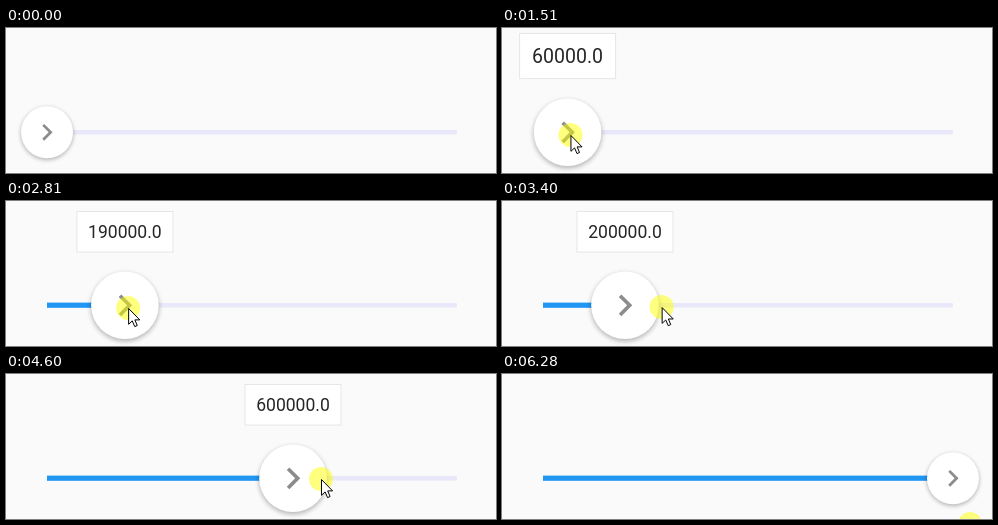
An HTML page that plays this animation: 490 by 145 pixels, repeating every 6410 ms.

```html
<!DOCTYPE html>
<html lang="en">
<head>
<meta charset="utf-8">
<title>Range step slider</title>
<style>
  html, body { margin: 0; width: 100%; height: 100%; overflow: hidden; background: #fafafa; }
  svg { display: block; width: 100vw; height: 100vh; }
  text { font-family: Roboto, sans-serif; fill: #262626; text-anchor: middle; }
</style>
</head>
<body>
<svg viewBox="0 0 490 145">
  <defs>
    <filter id="soft" x="-30%" y="-30%" width="160%" height="160%">
      <feGaussianBlur stdDeviation="2"/>
    </filter>
  </defs>
  <rect width="490" height="145" fill="#fafafa"/>
  <rect x="41" y="102" width="410" height="4.6" rx="1" fill="#e8e8fa"/>
  <rect id="bar" x="41" y="101.6" height="5.2" fill="#2196f3"/>
  <g id="tip">
    <rect id="box" fill="#fff" stroke="#e6e6e6"/>
    <text id="label"></text>
  </g>
  <g id="thumb">
    <circle cy="1.5" r="26.2" fill="#000" opacity=".28" filter="url(#soft)"/>
    <circle r="26" fill="#fff"/>
    <path d="M10 6L8.59 7.41 13.17 12l-4.58 4.59L10 18l6-6z" fill="#8c8c8c"
          transform="scale(1.4) translate(-12 -12)"/>
  </g>
  <g id="pointer">
    <circle r="12" fill="#ff0" opacity=".5"/>
    <path d="M.5 .5V16.3L4.1 12.9 6.6 18.6 9.1 17.5 6.7 11.9H11.6Z" fill="#fff" stroke="#000"/>
  </g>
</svg>
<script>
const LOOP = 6410, PRESS = 792, RELEASE = 5800;
const LEFT = 41, SPAN = 410, MID = 104.3, MAX = 1e6;
const GRAB = 4;            // pointer offset from the thumb centre
const FONT = 20.3, PAD = 13.5, MAX_BOX = 97;

// pointer path: time, x, y
const path = [
  [540, 54, 158], [780, 45, 107], [1200, 45, 107], [1850, 94, 107], [2120, 94, 107],
  [2790, 122, 107], [2860, 122.5, 107], [3450, 163, 106], [3910, 233, 105.5], [4140, 259, 105],
  [5260, 395, 105], [5390, 418, 105], [5700, 452, 107], [5810, 458, 107],
  [6110, 468, 151], [6279, 468, 151], [6280, 468, 150]
];

const el = id => document.getElementById(id);
const [bar, tip, box, label, thumb, pointer] =
  ['bar', 'tip', 'box', 'label', 'thumb', 'pointer'].map(el);
const clamp = (v, lo, hi) => Math.min(hi, Math.max(lo, v));
const set = (node, attrs) => {
  for (const name in attrs) node.setAttribute(name, attrs[name]);
};

function pointerAt(t) {
  if (t <= path[0][0]) return path[0].slice(1);
  const i = path.findIndex(p => p[0] > t);
  if (i < 0) return path[path.length - 1].slice(1);
  const [t0, x0, y0] = path[i - 1], [t1, x1, y1] = path[i];
  const k = (t - t0) / (t1 - t0);
  return [x0 + (x1 - x0) * k, y0 + (y1 - y0) * k];
}

// fine steps up to 200000, coarse ones above
function snap(raw) {
  const fine = Math.round(raw / 1e4) * 1e4;
  if (fine <= 2e5) return Math.max(0, fine);
  return clamp(Math.round(raw / 2e5) * 2e5, 2e5, MAX);
}

function valueAt(t) {
  if (t < PRESS) return 0;
  if (t >= RELEASE) return MAX;
  return snap((pointerAt(t)[0] - GRAB - LEFT) / SPAN * MAX);
}

function elasticOut(t) {
  if (t >= 1) return 1;
  return 2 ** (-10 * t) * Math.sin((t - 0.1) * 5 * Math.PI) + 1;
}

// cubic-bezier(.4, 0, .2, 1)
function fastOutSlowIn(x) {
  let lo = 0, hi = 1;
  for (let i = 0; i < 20; i++) {
    const s = (lo + hi) / 2, r = 1 - s;
    if (1.2 * r * r * s + 0.6 * r * s * s + s ** 3 < x) lo = s; else hi = s;
  }
  return 3 * lo * lo - 2 * lo ** 3;
}

function drawTip(x, value, slide) {
  const text = value.toFixed(1);
  const natural = ((text.length - 1) * 0.5615 + 0.263) * FONT + 2 * PAD;
  const k = Math.min(1, MAX_BOX / natural);
  const w = natural * k, h = 48 * k, top = 55 - 52 * k + slide;
  set(box, { x: x - w / 2 + 0.5, y: top + 0.5, width: w - 1, height: h - 1 });
  set(label, { x, y: top + h / 2 + 7.2 * k, 'font-size': FONT * k });
  label.textContent = text;
}

function draw(t) {
  const held = t >= PRESS && t < RELEASE;
  const value = valueAt(t), x = LEFT + value / MAX * SPAN;
  const scale = held ? 1 + 0.3 * elasticOut((t - PRESS) / 700) : 1;
  set(bar, { width: x - LEFT });
  set(thumb, { transform: `translate(${x} ${MID}) scale(${scale})` });
  set(tip, { visibility: held ? 'visible' : 'hidden' });
  if (held) drawTip(x, value, 53.8 * (1 - fastOutSlowIn(clamp((t - PRESS) / 200, 0, 1))));
  set(pointer, { transform: `translate(${pointerAt(t).join(' ')})` });
}

const start = performance.now();
function tick() {
  draw((performance.now() - start) % LOOP);
  requestAnimationFrame(tick);
}
tick();
</script>
</body>
</html>
```
